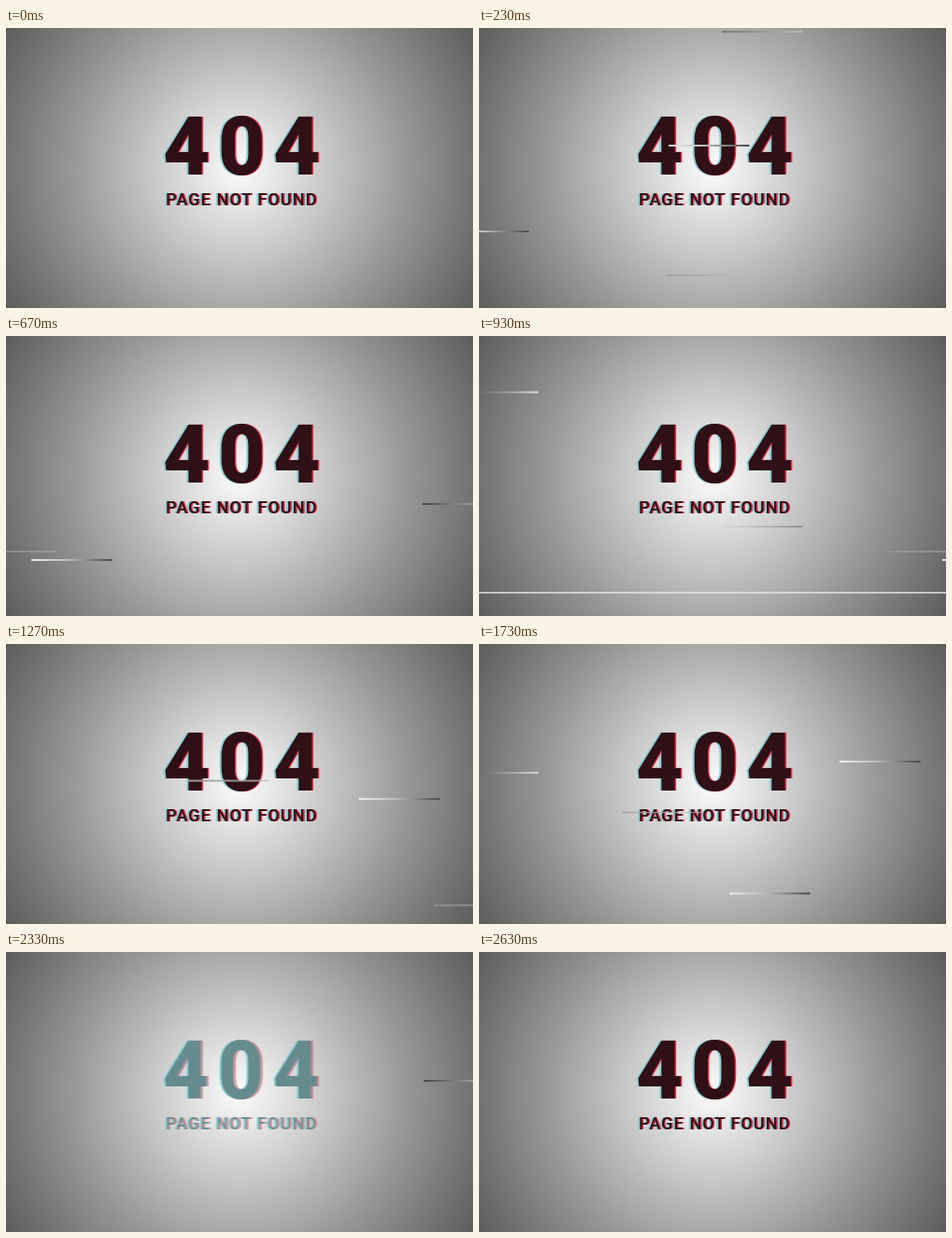
Animation of 500 by 300 pixels, one loop 2.71 s. Source, as an HTML page:

```html
<!DOCTYPE html>
<html lang="en">
<head>
<meta charset="utf-8">
<title>404</title>
<style>
  html, body { margin: 0; width: 100%; height: 100%; overflow: hidden; background: #888; }
  svg { display: block; width: 100vw; height: 100vh; }
  text { font-family: Roboto, sans-serif; text-anchor: middle; }
  .code { font-size: 87px; font-weight: 900; letter-spacing: 8.6px; }
  .note { font-size: 18px; font-weight: 500; letter-spacing: 1.13px; }
</style>
</head>
<body>
<svg viewBox="0 0 500 300" preserveAspectRatio="none">
  <defs>
    <radialGradient id="glow" gradientUnits="userSpaceOnUse" cx="250" cy="150" r="292">
      <stop offset="0" stop-color="#fcfcfc"/>
      <stop offset=".65" stop-color="#929292"/>
      <stop offset="1" stop-color="#5c5c5c"/>
    </radialGradient>
    <linearGradient id="fall">
      <stop offset="0" stop-color="#eee"/>
      <stop offset=".45" stop-color="#bbb"/>
      <stop offset="1" stop-color="#484848"/>
    </linearGradient>
    <linearGradient id="rise">
      <stop offset="0" stop-color="#484848"/>
      <stop offset=".6" stop-color="#999"/>
      <stop offset="1" stop-color="#dcdcdc"/>
    </linearGradient>
    <linearGradient id="faint">
      <stop offset="0" stop-color="#aaa" stop-opacity=".2"/>
      <stop offset="1" stop-color="#777"/>
    </linearGradient>
    <linearGradient id="pale">
      <stop offset="0" stop-color="#9a9a9a"/>
      <stop offset="1" stop-color="#bbb" stop-opacity=".7"/>
    </linearGradient>
    <g id="words">
      <text class="code" x="254.6" y="156.7">404</text>
      <text class="note" x="250.3" y="189.7">PAGE NOT FOUND</text>
    </g>
  </defs>
  <rect width="500" height="300" fill="url(#glow)"/>
  <use href="#words" fill="#86d0d4"/>
  <g id="ink">
    <use href="#words" x="3.5" fill="#e8304a"/>
    <use href="#words" x="2" fill="#2e1016"/>
  </g>
  <g id="lines"></g>
</svg>
<script>
const LOOP = 2710, STEP = 100 / 3, SPEED = 58.6, LENGTH = 86.5;
const BLINK = 62, RETURN = 65, LAST = 79;

// Sweeping dashes: step, x at that step, y, thickness, paint
const dashes = [
  [7, 260, 4, 1, 'rise'],
  [12, -23, 180, 2, 'rise'],
  [12, 260, 218, 2, 'fall'],
  [12, 494, 265, 1.5, 'pale'],
  [12, 496, 126, 2, 'fall'],
  [28, -23, 60.3, 2, 'rise'],
  [28, 260, 204.3, 1.2, 'faint'],
  [28, 436, 231, 1.2, 'pale'],
  [28, 496, 240, 2, 'fall'],
  [38, 195, 146.5, 2, 'pale'],
  [38, 378, 166, 2, 'fall'],
  [38, 458, 280, 1.2, 'pale'],
  [44, 260, 32, 1.5, 'rise'],
  [52, -23, 138, 2, 'rise'],
  [52, 153, 180.5, 1.2, 'pale'],
  [52, 268, 267.3, 2, 'fall'],
  [52, 386, 126, 2, 'fall'],
  [63, 37, 138, 2, 'rise'],
  [63, 260, 204.3, 1.2, 'faint'],
  [63, 436, 231, 1.2, 'pale'],
  [63, 461, 166, 2, 'fall']
];

// Full-width flashes: step, y, thickness
const flashes = [[12, 216.7, 1.5], [12, 281.5, 5], [28, 275, 1.5]];

const lines = document.getElementById('lines');
const ink = document.getElementById('ink');

function bar(y, width, height, fill) {
  const el = document.createElementNS('http://www.w3.org/2000/svg', 'rect');
  const attrs = { y: y - height / 2, width, height, fill };
  for (const key in attrs) el.setAttribute(key, attrs[key]);
  lines.append(el);
  return el;
}

const show = (el, on) => el.setAttribute('visibility', on ? 'visible' : 'hidden');

const flashBars = flashes.map(([at, y, h]) => ({ at, el: bar(y, 500, h, '#e4e7e5') }));
const dashBars = dashes.map(([at, x, y, h, paint]) =>
  ({ at, x, el: bar(y, LENGTH, h, `url(#${paint})`) }));

function draw(time) {
  const n = Math.floor((time % LOOP + 3.4) / STEP);
  const step = Math.min(n, LAST);
  for (const { at, x, el } of dashBars) {
    const left = x + (step - at) * SPEED;
    el.setAttribute('x', left);
    show(el, left > -LENGTH && left < 500);
  }
  for (const { at, el } of flashBars) show(el, Math.abs(step - at) <= 1);
  const back = Math.max(0, (step - RETURN) / (LAST - RETURN));
  ink.setAttribute('opacity', step < BLINK ? 1 : back);
}

const start = performance.now();
function tick() {
  draw(performance.now() - start);
  requestAnimationFrame(tick);
}
tick();
</script>
</body>
</html>
```
